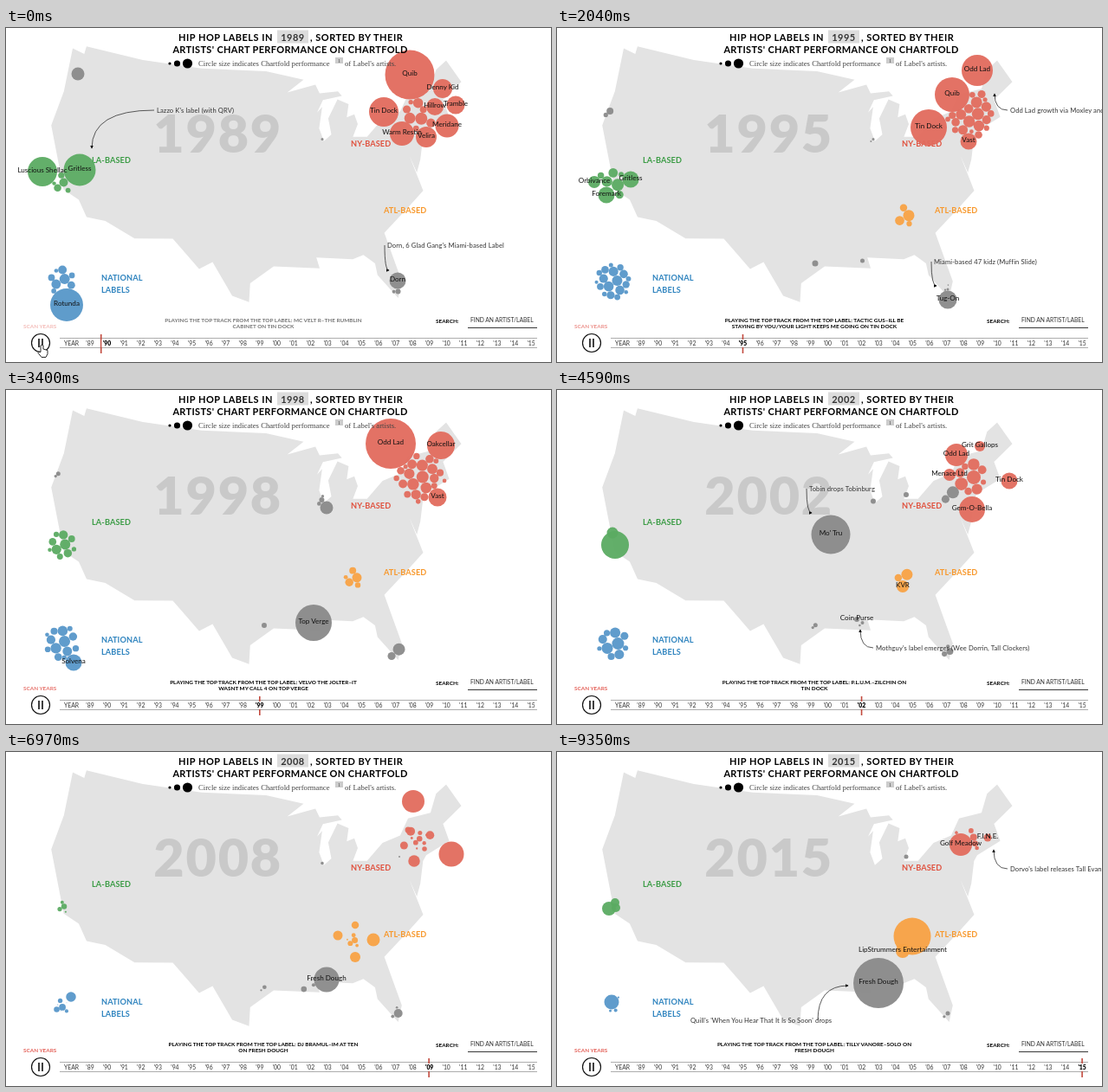
Recreate the animation shown at these times as an HTML page. Size 629 by 386 pixels, loop 9550 ms.

```html
<!DOCTYPE html>
<html lang="en">
<head>
<meta charset="utf-8">
<title>Hip hop labels by year</title>
<style>
html, body { margin: 0; width: 100%; height: 100%; overflow: hidden; background: #fff; }
svg { display: block; width: 629px; height: 386px; font-family: Lato, sans-serif; }
.title { font-size: 11px; font-weight: 700; letter-spacing: .5px; }
.legend { font: 8.7px "Liberation Serif", serif; fill: #444; }
.region { font-size: 9.2px; font-weight: 700; letter-spacing: .1px; }
.small { font-size: 6.4px; font-weight: 700; }
.note { font-size: 7.6px; letter-spacing: .1px; fill: #333; }
.name { font-size: 8.1px; text-anchor: middle; fill: #111; }
.tick { font-size: 6.8px; text-anchor: middle; fill: #333; }
.middle { text-anchor: middle; }
</style>
</head>
<body>
<svg viewBox="0 0 629 386">
  <defs>
    <marker id="tip" viewBox="0 0 6 6" refX="5" refY="3" markerWidth="3.500" markerHeight="3.500" orient="auto" markerUnits="userSpaceOnUse">
      <path d="M0 0L6 3L0 6z"/>
    </marker>
  </defs>
  <path id="land" fill="#e3e3e3"/>
  <text id="bigYear" x="319" y="144" text-anchor="end" font-size="61" font-weight="900" letter-spacing="1.800" fill="#c9c9c9"></text>
  <g class="region">
    <text x="99" y="156" fill="#3c9c46">LA-BASED</text>
    <text x="398" y="137" fill="#e0523f">NY-BASED</text>
    <text x="436" y="213.5" fill="#f7982c">ATL-BASED</text>
    <text x="110" y="292" fill="#2f84bf">NATIONAL</text>
    <text x="110" y="306" fill="#2f84bf">LABELS</text>
  </g>
  <g id="bubbles"></g>
  <g id="notes" class="note"></g>

  <g class="title">
    <text x="199" y="15">HIP HOP LABELS IN</text>
    <rect x="313" y="2.500" width="36" height="15" fill="#dcdcdc"/>
    <text id="titleYear" class="middle" x="331" y="15" fill="#333"></text>
    <text x="351" y="15">, SORTED BY THEIR</text>
    <text class="middle" x="328" y="29" style="letter-spacing:.33px">ARTISTS' CHART PERFORMANCE ON CHARTFOLD</text>
  </g>
  <circle cx="189" cy="41" r="1.6"/><circle cx="197.5" cy="41" r="3.6"/><circle cx="209.5" cy="41" r="5.6"/>
  <g class="legend">
    <text x="222" y="44">Circle size indicates Chartfold performance</text>
    <rect x="380" y="34" width="9" height="7" fill="#ccc"/>
    <text x="383" y="39.5" style="font-size:6px">1</text>
    <text x="391" y="44">of Label's artists.</text>
  </g>

  <g id="caption" class="small middle"></g>
  <text id="scan" class="small" x="20" y="347" fill="#e2584f">SCAN YEARS</text>
  <text class="small" x="496" y="340.5">SEARCH:</text>
  <text x="536" y="340" font-size="6.7" fill="#333">FIND AN ARTIST/LABEL</text>
  <path d="M533 346.5H613" stroke="#222" stroke-width=".9"/>
  <circle cx="40" cy="364" r="10.5" fill="#fff" stroke="#111" stroke-width="1.2"/>
  <path d="M38 359v10M42 359v10" stroke="#111" stroke-width="1.6"/>
  <path d="M62 358.5H613M62 369.5H613" stroke="#999" stroke-width=".8"/>
  <text class="tick" x="75.5" y="367">YEAR</text>
  <g id="timeline"></g>
  <path id="hand" d="M-2-6q1.500-1.500 3 0v4l5 1.500v4l-2 4h-5l-4-5q0-2 3-1z" fill="#fff" stroke="#111" stroke-width=".9"/>
</svg>
<script>
const $ = id => document.getElementById(id);
const STEP = 170, LOOP = 9550, LAST = 55;
const lerp = (a, b, k) => a + (b - a) * k;

// Albers equal-area conic, from degrees west and north
function project(west, north) {
  const n = .6029, rad = Math.PI / 180;
  const rho = Math.sqrt(1.3513 - 2 * n * Math.sin(north * rad)) / n;
  const theta = n * (96 - west) * rad;
  return [294 + 656 * rho * Math.sin(theta), 177 + 660 * (rho * Math.cos(theta) - 1.2943)];
}
const outline = [124.7,48.4, 122.8,48.2, 122.8,49, 114,49, 105,49, 95.2,49, 89.6,48, 92.1,46.8, 87.9,47.4,
  87.4,46.5, 84.7,46.5, 84.2,46, 87,45.8, 88,44.6, 87.2,45.1, 87.9,43, 87.4,41.7, 86.3,42.3, 86.5,43.9,
  84.9,45.7, 83.4,45.1, 83.9,43.8, 82.8,44, 82.5,43, 83.4,41.8, 81.5,41.6, 79,43.1, 76.4,43.5, 74.8,45,
  71.5,45, 70,46.7, 68.2,47.3, 67,44.8, 70.2,43.6, 70,41.8, 73.5,41, 74.1,40.5, 75.1,38.4, 75.9,37.2,
  76.4,39, 75.6,35.3, 77.8,34, 81.2,31.9, 80.1,26.8, 80.8,25.2, 82.7,27.8, 82.8,29, 84,30, 85.3,29.7,
  89.5,30.2, 89.2,29.1, 94.5,29.5, 97.2,27.8, 97.3,25.9, 99.2,26.5, 101.6,29.8, 103.1,29, 106.5,31.8,
  111,31.3, 114.8,32.5, 117.1,32.5, 118.5,34, 120.6,34.6, 124.4,40.4, 124.1,44];
let land = '';
for (let j = 0; j < outline.length; j += 2)
  land += (j ? 'L' : 'M') + project(outline[j], outline[j + 1]).map(v => v.toFixed(1));
$('land').setAttribute('d', land + 'z');

const hub = (x, y, color = '#8a8a8a') => ({ x, y, color });
const hubs = {
  ny: hub(477, 101, '#e26b5d'), la: hub(65, 179, '#5bab62'), atl: hub(401, 218, '#f8a244'),
  nat: hub(65, 293, '#5797c9'), west: hub(60, 97), philly: hub(454, 121), detroit: hub(403, 121),
  miami: hub(451, 302), chicago: hub(...project(87.6, 41.9)), houston: hub(...project(95.6, 29.8)),
  orleans: hub(...project(90.1, 29.9))
};

// Small labels spiral out from their hub, then collide until nothing overlaps
function swarm({ x, y }, [count, spread, size], big) {
  const dots = Array.from({ length: count }, (_, j) => {
    const angle = j * 2.4, reach = spread * Math.sqrt(j / count);
    return { x: x + reach * Math.cos(angle), y: y + reach * Math.sin(angle), r: size * (1 - .7 * j / count) };
  });
  for (let round = 0; round < 30; round++)
    for (const p of dots) for (const q of [...big, ...dots]) {
      const dx = p.x - q.x, dy = p.y - q.y, d = Math.hypot(dx, dy), gap = p.r + q.r - d;
      if (d && gap > 0) { p.x += dx / d * gap / 2; p.y += dy / d * gap / 2; }
    }
  return dots;
}

// leaders: [name, x, y, radius]; crowds: [count, spread, largest radius]; notes: [text, x, y, tipX, tipY, startX]
const scenes = [];
function scene(frame, year, track, leaders, crowds, notes = []) {
  const bubbles = {};
  for (const id in hubs) {
    const big = (leaders[id] || []).map(([name, x, y, r]) => ({ name, x, y, r }));
    const dots = swarm(hubs[id], crowds[id] || [0], big);
    [...dots, ...big].forEach((b, j) => bubbles[id + (b.name || j)] = { ...b, color: hubs[id].color });
  }
  scenes.push({ frame, year, track, bubbles, notes });
}

scene(0, 1989, ['MC VELT R–THE RUMBLIN', 'CABINET ON TIN DOCK'], {
  ny: [['Quib', 466, 54, 28.5], ['Denny Kid', 504, 70, 11], ['Tin Dock', 436, 97, 17], ['Hillrow', 495, 91, 10],
    ['Tramble', 519, 89, 10.5], ['Meridane', 509, 113, 13.5], ['Warm Restin', 457, 122, 14], ['Velira', 485, 126, 12]],
  la: [['Luscious Shellac', 42, 166, 17], ['Gritless', 85, 164, 18.5]],
  nat: [['Rotunda', 70, 320, 19]],
  west: [['', 83, 53, 7.5]],
  miami: [['Dorn', 452, 292, 9.5]]
}, { ny: [8, 18, 7], la: [5, 14, 5], nat: [8, 15, 6], miami: [2, 5, 3], chicago: [1, 0, 1.5] },
[["Lazzo K's label (with QRV)", 174, 98, 99, 139],
  ["Dorn, 6 Glad Gang's Miami-based Label", 440, 254, 442, 280]]);

scene(12, 1995, ['TACTIC GUS–ILL BE', 'STAYING BY YOU/YOUR LIGHT KEEPS ME GOING ON TIN DOCK'], {
  ny: [['Odd Lad', 485, 49, 18], ['Quib', 456, 77, 20], ['Tin Dock', 429, 115, 21], ['Vast', 475, 131, 9.5]],
  la: [['Orbivance', 43, 178, 7], ['Gritless', 85, 175, 9.5], ['Foremark', 57, 193, 9.5]],
  miami: [['Tug-On', 451, 314, 10.5]]
}, { ny: [20, 24, 7], la: [6, 15, 7], atl: [4, 10, 6.5], nat: [18, 20, 6], west: [2, 6, 4], miami: [3, 6, 1.5],
  chicago: [2, 5, 1.5], houston: [1, 0, 3.5], orleans: [1, 0, 2.5] },
[['Odd Lad growth via Moxley and more', 523, 98, 505, 76],
  ['Miami-based 47 kidz (Muffin Slide)', 435, 273, 438, 298]]);

scene(20, 1998, ['VELVO THE JOLTER–IT', 'WASNT MY CALL 4 ON TOP VERGE'], {
  ny: [['Odd Lad', 444, 62, 29], ['Oakcellar', 502, 64, 16], ['Vast', 498, 124, 10.5]],
  nat: [['Solvena', 78, 315, 9.5]],
  chicago: [['', 370, 136, 7.5]],
  orleans: [['Top Verge', 355, 269, 21]]
}, { ny: [22, 30, 7], la: [10, 16, 6], atl: [5, 10, 5.5], nat: [13, 21, 6.5], west: [2, 5, 2.5], miami: [2, 9, 7],
  chicago: [3, 7, 3], houston: [1, 0, 3] });

scene(27, 2002, ['P.L.U.M.–ZILCHIN ON', 'TIN DOCK'], {
  ny: [['Odd Lad', 461, 75, 13], ['Grit Gallops', 488, 65, 6], ['Menace Ltd', 453, 98, 7],
    ['Gem-O-Bella', 479, 138, 15], ['Tin Dock', 522, 105, 9.5]],
  la: [['', 67, 179, 16], ['', 64, 165, 6.5]],
  atl: [['KVR', 399, 227, 7]],
  chicago: [["Mo' Tru", 316, 167, 22.5]],
  orleans: [['Coin Purse', 346, 265, 3]]
}, { ny: [9, 17, 8], atl: [2, 6, 6.5], nat: [10, 15, 7], miami: [3, 6, 4], philly: [2, 8, 7], detroit: [1, 0, 3],
  chicago: [1, 0, 3], houston: [2, 5, 2.5], orleans: [2, 6, 2] },
[['Tobin drops Tobinburg', 291, 117, 294, 142],
  ["Mothguy's label emerges (Wee Dorrin, Tall Clockers)", 368, 301, 350, 277]]);

scene(35, 2005, ['V.O.–HOW WE GLIDE', 'ON PRIME BUSTLE'], {
  ny: [['K Squad', 470, 57, 26], ['Murky', 514, 118, 29], ['Meridane', 471, 126, 13.5],
    ['', 461, 93, 8], ['', 490, 87, 8], ['', 454, 110, 7.5]],
  atl: [['Prime Bustle', 383, 212, 11], ['KVR', 403, 200, 8.5], ['ZQL', 424, 217, 15], ['TerriGlen', 403, 237, 12]],
  nat: [['Lumeria', 75, 283, 11.5]]
}, { ny: [4, 9, 2.5], la: [3, 4, 2], atl: [4, 8, 3], nat: [4, 11, 6], miami: [1, 0, 5], houston: [2, 6, 3.5],
  orleans: [3, 6, 4] },
[["80 Dime's label signs The Quest", 441, 2.5, 441, 21],
  ["Prime Bustle: V.O.'s label", 407, 249, 389, 226]]);

scene(47, 2011, ['DJ BRAMUL–IM AT TEN', 'ON FRESH DOUGH'], {
  ny: [['', 464, 90, 7], ['', 483, 112, 5.5]],
  orleans: [['Fresh Dough', 370, 263, 29], ['', 339, 276, 3.5]]
}, { ny: [10, 14, 4], la: [4, 7, 4.5], atl: [5, 8, 4], nat: [7, 7, 1.8], miami: [3, 7, 5], philly: [1, 0, 2],
  chicago: [1, 0, 3.5], houston: [1, 0, 1.2] },
[["Tall Evan launches on Dorvo's label, fast", 502, 142, 484, 120]]);

scene(LAST, 2015, ['TILLY VANORE–SOLO ON', 'FRESH DOUGH'], {
  ny: [['Golf Meadow', 466, 107, 13], ['F.I.N.E.', 497, 99, 4.5]],
  la: [['', 60, 181, 8], ['', 67, 174, 5], ['', 68, 180, 5]],
  atl: [['', 410, 213, 21.5], ['LipStrummers Entertainment', 399, 230, 8]],
  nat: [['', 63, 289, 8.5]],
  orleans: [['Fresh Dough', 371, 267, 29]]
}, { ny: [5, 16, 4], nat: [3, 7, 2], miami: [2, 8, 2.5], detroit: [1, 0, 2.5] },
[["Dorvo's label releases Tall Evan", 523, 138, 504, 113],
  ["Quill's 'When You Hear That It Is So Soon' drops", 154, 313, 336, 270, 301]]);

const text = (x, y, s, cls = '') => `<text x="${x}" y="${y}" class="${cls}">${s}</text>`;

function note([s, x, y, tipX, tipY, startX = x - 3]) {
  const bend = tipX > startX ? [startX, tipY] : [tipX, y - 3];
  return text(x, y, s) + `<path d="M${startX} ${y - 3}Q${bend} ${tipX} ${tipY}" fill="none"
    stroke="#333" stroke-width=".8" marker-end="url(#tip)"/>`;
}

function drawBubbles(from, to, k) {
  let circles = '', names = '';
  const near = k < .5 ? from : to;
  for (const key in { ...from.bubbles, ...to.bubbles }) {
    const a = from.bubbles[key] || { ...to.bubbles[key], r: 0 };
    const b = to.bubbles[key] || { ...a, r: 0 };
    const x = lerp(a.x, b.x, k), y = lerp(a.y, b.y, k);
    circles += `<circle cx="${x}" cy="${y}" r="${lerp(a.r, b.r, k)}" fill="${a.color}" fill-opacity=".95"/>`;
    if (a.name && near.bubbles[key]) names += text(x, y + 1, a.name, 'name');
  }
  $('bubbles').innerHTML = circles + names;
}

function drawTimeline(frame) {
  const flow = .465 * frame + 1.05, active = Math.min(26, Math.floor(flow));
  const tickX = n => 97 + 19.58 * n;
  const x = tickX(active - 1 + Math.min(1, (flow % 1 + .08) / .2));
  let out = `<path d="M${x} 354V376" stroke="#c2493d" stroke-width="1.6"/>
    <rect x="${tickX(active) - 6}" y="360" width="13" height="9" fill="#fff"/>`;
  for (let n = 0; n <= 26; n++) {
    const label = "'" + String((89 + n) % 100).padStart(2, '0');
    out += text(tickX(n), 367, n === active ? `<tspan font-weight="900" fill="#000">${label}</tspan>` : label, 'tick');
  }
  $('timeline').innerHTML = out;
}

function draw(frame) {
  const from = scenes.filter(s => s.frame <= frame).pop();
  const to = scenes[scenes.indexOf(from) + 1] || from;
  const k = from === to ? 0 : (frame - from.frame) / (to.frame - from.frame);
  const near = k < .5 ? from : to;
  const year = 1989 + Math.floor(.465 * frame + .5);

  $('bigYear').textContent = $('titleYear').textContent = year;
  drawBubbles(from, to, k);
  drawTimeline(frame);
  $('notes').innerHTML = near.year === year ? near.notes.map(note).join('') : '';
  $('caption').innerHTML = text(297, 340, 'PLAYING THE TOP TRACK FROM THE TOP LABEL: ' + near.track[0]) +
    text(297, 347, near.track[1]);
  $('caption').setAttribute('opacity', Math.min(1, .55 + .25 * frame));
  $('scan').setAttribute('opacity', Math.min(.95, .4 + .022 * frame));
  $('hand').setAttribute('transform', `translate(${42 - 6 * frame} 373)`);
}

let shown = -1;
function tick() {
  const frame = Math.min(LAST, Math.floor(performance.now() % LOOP / STEP));
  if (frame !== shown) draw(shown = frame);
  requestAnimationFrame(tick);
}
tick();
</script>
</body>
</html>
```
